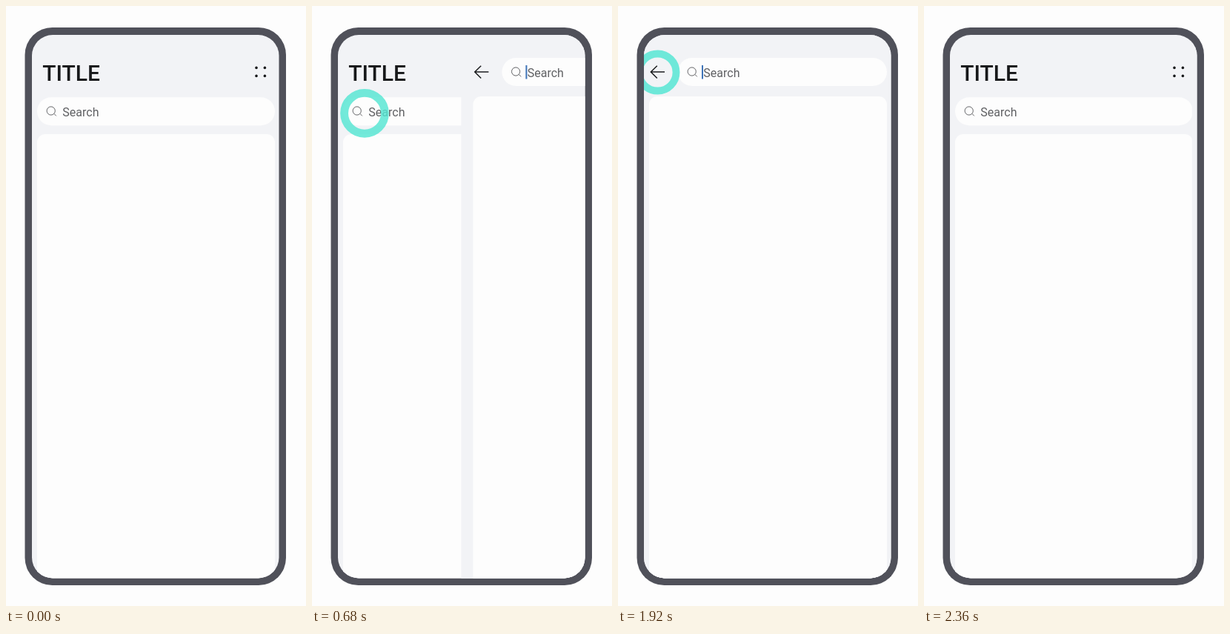
Recreate the animation shown at these times as an HTML page. Size 405x810 px, loop 4080 ms.

```html
<!DOCTYPE html>
<html lang="en">
<head>
<meta charset="utf-8">
<style>
  html, body { margin: 0; height: 100%; overflow: hidden; background: #fdfdfd; }
  svg { display: block; width: 405px; height: 810px; font: 16px Roboto, sans-serif; }
  .white { fill: #fdfdfd; }
  .label { fill: #5f6063; }
  .line { fill: none; stroke: #5f6063; }
</style>
</head>
<body>
<svg viewBox="0 0 405 810">
  <defs>
    <clipPath id="screen"><rect x="35" y="39" width="333.5" height="733.5" rx="28"/></clipPath>
    <g id="field">
      <circle class="line" cx="60.7" cy="141.5" r="5.6"/>
      <path class="line" d="M64.8 145.4l3 3"/>
      <text class="label" x="76.3" y="148.5">Search</text>
    </g>
  </defs>
  <rect x="25.5" y="29" width="352.5" height="753" rx="37" fill="#50515a"/>
  <g clip-path="url(#screen)">
    <rect x="26" y="30" width="352" height="752" fill="#f2f3f6"/>
    <text x="49.2" y="101" font-size="30" font-weight="500" fill="#17181a">TITLE</text>
    <g fill="#17181a">
      <circle cx="338" cy="83.4" r="1.8"/><circle cx="349.4" cy="83.4" r="1.8"/>
      <circle cx="338" cy="94.4" r="1.8"/><circle cx="349.4" cy="94.4" r="1.8"/>
    </g>
    <rect class="white" x="42" y="123.3" width="321" height="38" rx="19"/>
    <rect class="white" x="42" y="173" width="321" height="640" rx="11"/>
    <use href="#field"/>
    <g id="page">
      <rect x="26" y="30" width="352" height="752" fill="#f2f3f6"/>
      <path d="M63 89H44.3M52.8 80.7L44.3 89l8.5 8.5" fill="none" stroke="#1d1e20" stroke-width="1.5"/>
      <rect class="white" x="81" y="70" width="282" height="38" rx="19"/>
      <rect class="white" x="42" y="122" width="321" height="690" rx="11"/>
      <use href="#field" x="39" y="-53"/>
      <rect x="113" y="80" width="2" height="18.5" fill="#3f74b8"/>
    </g>
    <circle id="ring" fill="none" stroke="#52e6d3"/>
  </g>
</svg>
<script>
  const LOOP = 4080, STEP = 40, WIDTH = 352, OMEGA = 0.0185;
  const page = document.getElementById('page');
  const ring = document.getElementById('ring');
  const mix = (a, b, k) => a + (b - a) * Math.min(1, Math.max(0, k));

  // Critically damped spring from 0 to 1
  function spring(ms) {
    const x = OMEGA * Math.max(0, ms);
    return 1 - (1 + x) * Math.exp(-x);
  }

  function pageOffset(t) {
    if (t < 1080) return WIDTH * (1 - spring(Math.min(t, 960) - 589));
    if (t < 1920) return 0;
    return WIDTH * spring(Math.min(t, 2360) - 2098);
  }

  // Press in, then spread and fade out
  function drawRing(ms, x, y, size, alpha) {
    const scale = ms < 160 ? mix(1, 0.88, ms / 160) : mix(0.88, 1.15, (ms - 160) / 280);
    const r = size * scale;
    ring.setAttribute('cx', x);
    ring.setAttribute('cy', y);
    ring.setAttribute('r', r * 0.835);
    ring.setAttribute('stroke-width', r * 0.33);
    ring.setAttribute('opacity', mix(alpha, 0.8, ms / 160) * mix(1, 0, (ms - 280) / 160));
  }

  function draw(now) {
    const t = Math.floor(now % LOOP / STEP) * STEP;
    page.setAttribute('transform', `translate(${pageOffset(t)})`);
    if (t >= 400 && t < 840) drawRing(t - 400, 71, 144.8, 33, 0.65);
    else if (t >= 1920 && t < 2360) drawRing(t - 1920, 53.5, 89.5, 30, 0.82);
    else ring.setAttribute('opacity', 0);
  }

  const start = performance.now();
  function frame() {
    draw(performance.now() - start);
    requestAnimationFrame(frame);
  }
  frame();
</script>
</body>
</html>
```
